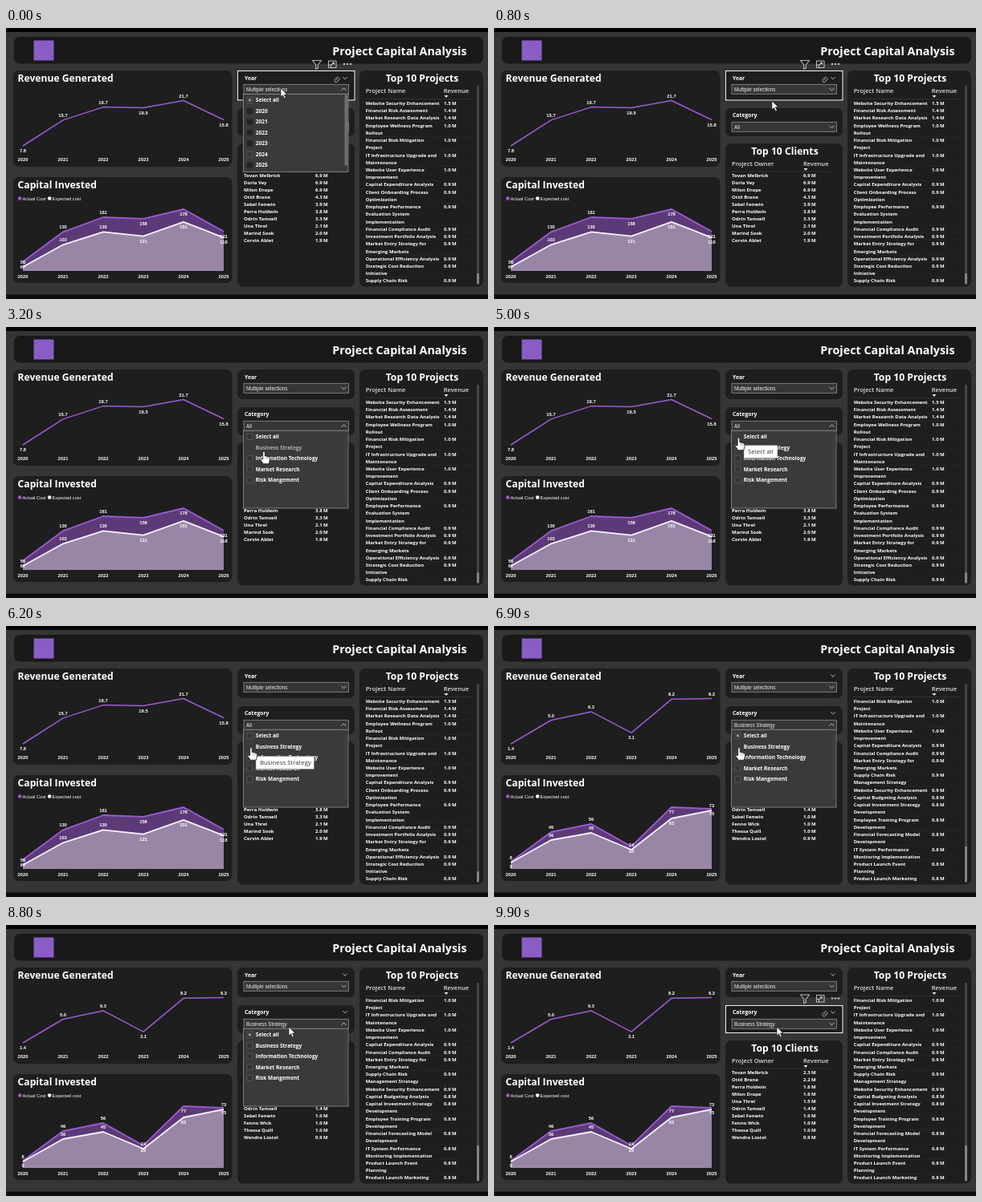
Recreate the animation shown at these times as an HTML page. Size 600 px wide and 338 px high, loop 10 s.

```html
<!DOCTYPE html>
<html lang="en">
<head>
<meta charset="utf-8">
<title>Project Capital Analysis</title>
<style>
  html, body { margin: 0; width: 100%; height: 100%; overflow: hidden; background: #050505; }
  svg { display: block; width: 100vw; height: 100vh; }
  text { font-family: "Open Sans", "Noto Sans", sans-serif; font-weight: 700; white-space: pre; }
  .medium { font-weight: 600; }
  .light { font-weight: 400; }
  .arial { font-family: "Liberation Sans", Arial, sans-serif; font-weight: 400; }
  .label { font-family: "Liberation Sans", Arial, sans-serif; font-weight: 700; }
</style>
</head>
<body>
<svg id="stage" viewBox="0 0 600 338" xmlns="http://www.w3.org/2000/svg"></svg>
<script>
const LOOP = 10000;
const PURPLE = '#9b5bd2';
const ROW = 9.23;
const stage = document.getElementById('stage');

// Markup helpers; text is placed by its vertical middle.
const text = (x, cy, size, str, { cls = '', fill = '#fff', anchor = 'start' } = {}) =>
  `<text x="${x}" y="${(cy + size * 0.36).toFixed(2)}" font-size="${size}" class="${cls}" fill="${fill}" text-anchor="${anchor}">${str}</text>`;
const rect = (x, y, w, h, fill, extra = '') =>
  `<rect x="${x}" y="${y}" width="${w}" height="${h}" fill="${fill}" ${extra}/>`;
const path = (d, stroke, width = 1, fill = 'none') =>
  `<path d="${d}" fill="${fill}" stroke="${stroke}" stroke-width="${width}" stroke-linejoin="round"/>`;
const group = (id, content) => `<g id="${id}">${content}</g>`;
const panel = (x, y, w, h, fill = '#1e1e1e') => rect(x, y, w, h, fill, 'rx="7"');
const chevron = (x, y, dir = 1, r = 3) =>
  path(`M${x - r} ${y - dir * r / 2}L${x} ${y + dir * r / 2}L${x + r} ${y - dir * r / 2}`, '#d0d0d0', 0.9);
const sortMark = (x, y) => `<path d="M${x - 2.5} ${y - 1.5}h5l-2.5 3z" fill="#e8e8e8"/>`;

// Data: one entry per filter state.
const states = [
  {
    revenue: [7.8, 15.7, 19.7, 19.5, 21.7, 15.8],
    cost: { values: [67, 130, 161, 158, 178, 131], sides: 'duuddd' },
    expected: { values: [56, 103, 130, 121, 151, 118], sides: 'uuuddd' },
    costScale: 0.59,
    thumb: 306,
    clients: `Tovan Melbrick 6.9|Dorla Vey 6.9|Milon Drape 6.9|Ottil Brane 4.3|Sabel Fenwin 3.9|Perra Holdwin 3.8|Odrin Tamsell 3.3|Una Threl 2.1|Marind Sook 2.0|Corvin Ablet 1.9`,
    projects: `Website Security Enhancement 1.5|Financial Risk Assessment 1.4|Market Research Data Analysis 1.4|Employee Wellness Program/Rollout 1.0|Financial Risk Mitigation/Project 1.0|IT Infrastructure Upgrade and/Maintenance 1.0|Website User Experience/Improvement 1.0|Capital Expenditure Analysis 0.9|Client Onboarding Process/Optimization 0.9|Employee Performance/Evaluation System/Implementation 0.9|Financial Compliance Audit 0.9|Investment Portfolio Analysis 0.9|Market Entry Strategy for/Emerging Markets 0.9|Operational Efficiency Analysis 0.9|Strategic Cost Reduction/Initiative 0.9|Supply Chain Risk 0.9`
  },
  {
    revenue: [1.4, 5.0, 6.3, 3.1, 8.2, 8.3],
    cost: { values: [9, 46, 56, 28, 77, 75], sides: 'duuddd' },
    expected: { values: [8, 36, 45, 24, 63, 73], sides: 'uuuudu' },
    costScale: 1,
    thumb: 275,
    clients: `Tovan Melbrick 2.3|Ottil Brane 2.2|Perra Holdwin 1.6|Milon Drape 1.6|Una Threl 1.5|Odrin Tamsell 1.4|Sabel Fenwin 1.0|Fenno Wick 1.0|Thessa Quill 1.0|Wendra Lostel 0.9`,
    projects: `Financial Risk Mitigation/Project 1.0|IT Infrastructure Upgrade and/Maintenance 1.0|Website User Experience/Improvement 1.0|Capital Expenditure Analysis 0.9|Financial Compliance Audit 0.9|Market Entry Strategy for/Emerging Markets 0.9|Supply Chain Risk/Management Strategy 0.9|Website Security Enhancement 0.9|Capital Budgeting Analysis 0.8|Capital Investment Strategy/Development 0.8|Employee Training Program/Development 0.8|Financial Forecasting Model/Development 0.8|IT System Performance/Monitoring Implementation 0.8|Product Launch Event/Planning 0.8|Product Launch Marketing 0.8`
  }
];

const chartX = i => 21 + i * 50;
const lineThrough = ys => 'M' + ys.map((y, i) => `${chartX(i)} ${y.toFixed(1)}`).join('L');
const pointLabel = (i, y, str, below) =>
  text(chartX(i), y + (below ? 6 : -6), 5.8, str, { cls: 'label', anchor: 'middle' });
const yearAxis = y => [...Array(6).keys()]
  .map(i => text(chartX(i), y, 5.8, 2020 + i, { cls: 'label', anchor: 'middle' })).join('');

function revenueChart({ revenue }) {
  const low = Math.min(...revenue), high = Math.max(...revenue);
  const ys = revenue.map(v => 147 - (v - low) / (high - low) * 56.5);
  return path(lineThrough(ys), PURPLE, 1.5) + revenue.map((v, i) =>
    pointLabel(i, ys[i], v.toFixed(1), i === 0 || v < revenue[i - 1])).join('');
}

function costChart({ cost, expected, costScale }) {
  const top = Math.max(...cost.values);
  const toY = v => 226 + (top - v) * costScale;
  const area = (ys, fill) => `<path d="${lineThrough(ys)}V303H21Z" fill="${fill}"/>`;
  const labels = ({ values, sides }) => values
    .map((v, i) => pointLabel(i, toY(v), v, sides[i] === 'd')).join('');
  const costY = cost.values.map(toY), expectedY = expected.values.map(toY);
  return area(costY, '#5c3a77') + area(expectedY, '#9986a7') +
    path(lineThrough(costY), PURPLE, 1.8) + path(lineThrough(expectedY), '#f6f1fa', 1.8) +
    labels(cost) + labels(expected);
}

const splitRow = row => [row.slice(0, -4), row.slice(-3) + ' M'];

function clientRows({ clients }) {
  return clients.split('|').map((row, i) => {
    const [name, value] = splitRow(row), y = 184 + i * 9;
    return text(296, y, 6, name) + text(385, y, 6, value);
  }).join('');
}

function projectRows({ projects }) {
  let line = 0;
  return projects.split('|').map(row => {
    const [name, value] = splitRow(row);
    const y = 93.8 + line * ROW;
    const parts = name.split('/');
    line += parts.length;
    return parts.map((part, i) => text(447.7, y + i * ROW, 5.95, part)).join('') +
      text(545, y, 6, value) +
      path(`M447 ${(y + (parts.length - 0.5) * ROW).toFixed(1)}H580`, '#303030', 0.4);
  }).join('');
}

const dataLayer = (state, i) => group(`data${i}`,
  revenueChart(state) + costChart(state) + clientRows(state) +
  `<g clip-path="url(#tableClip)">${projectRows(state)}</g>` +
  rect(586, state.thumb, 3, 319 - state.thumb, '#858585', 'rx="1"'));

const dropdown = (y, content) =>
  rect(296, y, 130.5, 12, '#363636', 'stroke="#8c8c8c" stroke-width=".8"') + content;
const value = (y, str) => text(299, y, 6.3, str, { cls: 'arial', fill: '#eee' });

const checkbox = (y, id, kind) => group(id,
  rect(300, y - 3.5, 7, 7, kind === 'on' ? '#232323' : '#343434',
    `stroke="${kind === 'on' ? '#2c2c2c' : '#5e5a56'}" stroke-width=".8"`) +
  (kind === 'some' ? rect(302, y - 1.5, 3, 3, '#999') : ''));

function popup(id, y, height, items, kinds) {
  const rows = items.map((item, i) => {
    const cy = y + 7.5 + i * 13.5;
    return checkbox(cy, `${id}Box${i}`, kinds[i]) + group(`${id}Item${i}`, text(310.8, cy, 6.5, item));
  }).join('');
  return group(id, rect(295.5, y, 130.5, height, '#3a3a3a', 'stroke="#858585" stroke-width=".9"') + rows +
    rect(421.5, y + 1, 4, height - 9, id === 'yearPopup' ? '#6e6e6e' : '#3f3f3f'));
}

// Outline and toolbar shown while a slicer is in use.
const outline = (id, y, h) =>
  group(id, rect(288.5, y, 145.5, h, 'none', 'stroke="#f0f0f0" stroke-width="1"'));
const toolbar = (id, y) => group(id,
  path(`M381.5 ${y - 4.5}h11l-4.2 5.5v4l-2.6 1.2v-5.2z`, '#b8b8b8', 1.1) +
  path(`M401.5 ${y - 4}h9.5v8.5h-9.5zM404 ${y + 2}l4.5-4h-3m3 0v3M401.5 ${y + 1}h3v3`, '#b8b8b8', 1.1) +
  [421, 425, 429].map(x => `<circle cx="${x}" cy="${y}" r="1.3" fill="#b8b8b8"/>`).join('') +
  path(`M408.5 ${y + 20}l4-4 3 2.5-4 4h-1.5zM410.5 ${y + 18}l3 2.5`, '#c8c8c8', 0.8) +
  chevron(422, y + 17.5, 1, 2.6));

const tooltip = (id, y, w, str) => group(id,
  rect(311, y, w, 16, '#fff', 'stroke="#777" stroke-width=".6"') +
  text(316, y + 8, 7.8, str, { cls: 'light', fill: '#333' }));

const columnHead = (x, y, str) => text(x, y, 7.6, str, { cls: 'medium', fill: '#dcdcdc' });
const middle = { anchor: 'middle' };

stage.innerHTML =
  `<defs><clipPath id="tableClip"><rect x="440" y="88" width="145" height="231"/></clipPath></defs>` +
  rect(0, 0, 600, 338, '#353535') + rect(0, 0, 600, 5, '#050505') + rect(0, 332.5, 600, 6, '#0a0f0a') +
  panel(10, 11, 584, 33.5, '#191919') + rect(34.5, 15.5, 25, 25, '#8a5cc6') +
  text(573.5, 28.7, 14.3, 'Project Capital Analysis', { anchor: 'end' }) +
  panel(9, 53, 272.5, 120) + text(14.5, 63, 12.15, 'Revenue Generated') + yearAxis(163.5) +
  panel(9, 186, 272.5, 132) + text(14.5, 196, 12.2, 'Capital Invested') + yearAxis(310) +
  `<circle cx="17.2" cy="212.5" r="2.3" fill="${PURPLE}"/><circle cx="54.2" cy="212.5" r="2.3" fill="#fff"/>` +
  text(20.5, 212.5, 5.7, 'Actual Cost', { cls: 'arial' }) + text(57.5, 212.5, 5.7, 'Expected cost', { cls: 'arial' }) +
  panel(288, 53, 146, 37) + panel(288, 100, 146, 35) +
  panel(288, 144, 146, 178.5) + text(362, 153.7, 12.2, 'Top 10 Clients', middle) +
  columnHead(296, 169, 'Project Owner') + columnHead(385, 169, 'Revenue') + sortMark(388, 176.5) +
  path('M296 179H418', '#444', 0.5) +
  panel(440, 53, 154, 269.5) + text(518, 63, 12.2, 'Top 10 Projects', middle) +
  columnHead(447.7, 78.5, 'Project Name') + columnHead(544.7, 78.5, 'Revenue') + sortMark(548, 85.5) +
  path('M447 88.5H580', '#444', 0.5) + rect(586, 72, 3, 248, '#444') +
  states.map(dataLayer).join('') +
  text(297, 62.5, 6.8, 'Year') + text(297, 109, 6.8, 'Category') +
  dropdown(70.3, value(76.5, 'Multiple selections')) +
  dropdown(117.3, group('valueAll', value(123.5, 'All')) + group('valueChosen', value(123.5, 'Business Strategy'))) +
  group('yearDown', chevron(420.5, 76.3)) + group('yearUp', chevron(420.5, 76.3, -1)) +
  group('categoryDown', chevron(420.5, 123.3)) + group('categoryUp', chevron(420.5, 123.3, -1)) +
  group('yearArrow', chevron(422, 62, 1, 2.6)) + group('categoryArrow', chevron(422, 108.5, 1, 2.6)) +
  outline('yearOutline', 53.5, 36.5) + outline('categoryOutline', 100.5, 34) +
  toolbar('yearTools', 45) + toolbar('categoryTools', 91.5) +
  popup('yearPopup', 82.5, 97, ['Select all', 2020, 2021, 2022, 2023, 2024, 2025],
    ['some', 'on', 'on', 'on', 'on', 'off', 'on']) +
  popup('categoryPopup', 129.3, 96.7,
    ['Select all', 'Business Strategy', 'Information Technology', 'Market Research', 'Risk Mangement'],
    ['off', 'off', 'off', 'off', 'off']) +
  group('someChosen', rect(302, 135.3, 3, 3, '#999')) +
  tooltip('tipAll', 147.5, 42, 'Select all') + tooltip('tipStrategy', 162.5, 72.5, 'Business Strategy') +
  group('arrow', path('M0 0V11.2L2.6 8.8L4.5 13L6.4 12.1L4.5 8.1H8Z', '#111', 0.7, '#fff')) +
  group('hand', path('M-1.2 1Q0-.8 1.2 1V5.2L2.6 5.4L5.4 6.2Q7.2 6.8 6.8 9L5.6 14H-.6L-3.8 9.4Q-4 7.6-1.2 9Z', '#111', 0.7, '#fff') +
    path('M2.6 6.6V8.6M4.6 7V8.8', '#555', 0.5));

const byId = {};
stage.querySelectorAll('g[id]').forEach(g => { byId[g.id] = g; });
const show = (id, on) => { byId[id].style.display = on ? '' : 'none'; };

// Pointer stops: time, x, y.
const stops = [
  [0, 342, 75], [500, 342, 75], [1400, 357, 135], [1800, 357, 135], [2200, 350, 124], [2500, 350, 124],
  [3000, 321, 155], [3400, 321, 155], [4000, 304.5, 138], [5200, 304.5, 138], [5600, 305, 151.5],
  [7800, 305, 151.5], [8800, 352, 127], [LOOP, 352, 127]
];
const ease = p => p * p * (3 - 2 * p);

function pointerAt(t) {
  const n = stops.findIndex(stop => stop[0] > t);
  const [t0, x0, y0] = stops[n - 1], [t1, x1, y1] = stops[n];
  const p = ease((t - t0) / (t1 - t0));
  return [x0 + (x1 - x0) * p, y0 + (y1 - y0) * p];
}

function render(t) {
  const within = (from, to) => t >= from && t < to;
  const yearOpen = t < 500;
  const categoryOpen = within(2400, 9200);
  const filtered = t >= 6900;
  const yearActive = t < 900;
  const categoryTools = t >= 9000;
  const [x, y] = pointerAt(t);
  const hand = categoryOpen && y > 130;
  const hovered = hand ? Math.floor((y + 1 - 129.5) / 13.5) : -1;

  show('data0', !filtered);
  show('data1', filtered);
  show('valueAll', !filtered);
  show('valueChosen', filtered);
  show('yearPopup', yearOpen);
  show('yearUp', yearOpen);
  show('yearDown', !yearOpen);
  show('categoryPopup', categoryOpen);
  show('categoryUp', categoryOpen);
  show('categoryDown', !categoryOpen);
  show('someChosen', categoryOpen && filtered);
  show('yearOutline', yearActive);
  show('yearTools', yearActive);
  show('categoryOutline', within(1200, 2400) || categoryTools);
  show('categoryTools', categoryTools);
  show('yearArrow', filtered);
  show('categoryArrow', filtered && !categoryTools);
  show('tipAll', within(4500, 5250));
  show('tipStrategy', within(5900, 6800));
  for (let i = 0; i < 5; i++) show(`categoryPopupBox${i}`, i !== hovered);
  byId.categoryPopupItem1.style.opacity = within(2900, 3600) ? 0.6 : 1;

  show('hand', hand);
  show('arrow', !hand);
  byId[hand ? 'hand' : 'arrow'].setAttribute('transform',
    `translate(${x.toFixed(2)} ${y.toFixed(2)}) scale(${hand ? 1.12 : 1})`);
}

const start = performance.now();
function tick() {
  render((performance.now() - start) % LOOP);
  requestAnimationFrame(tick);
}
tick();
</script>
</body>
</html>
```
